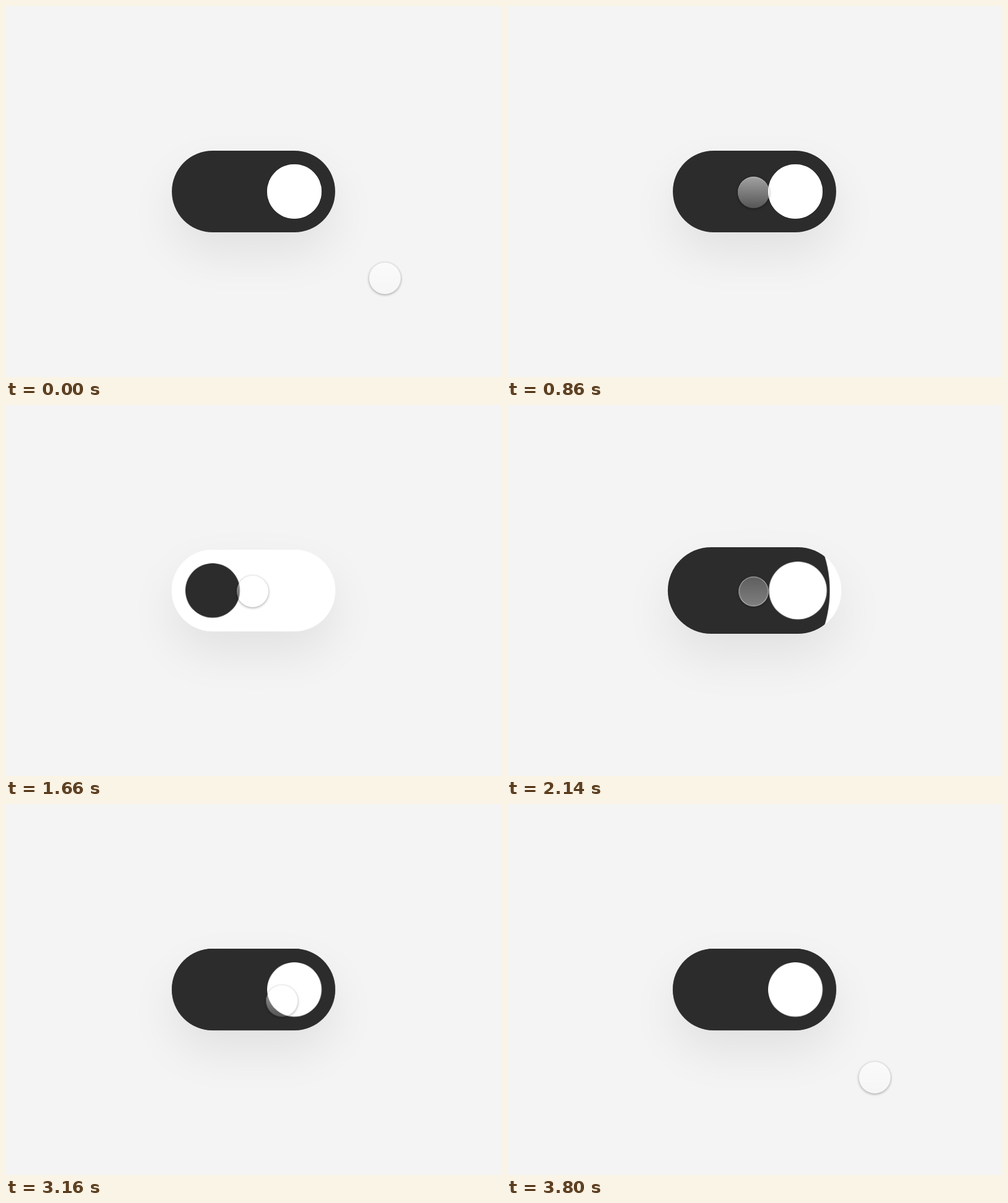
An HTML page for the animation above (3820 ms loop, 800x600 px).

```html
<!DOCTYPE html>
<html lang="en">
<head>
<meta charset="utf-8">
<title>Toggle</title>
<style>
  :root { --dark: #2c2c2c; --loop: 3820ms linear infinite; }
  html, body { margin: 0; width: 100%; height: 100%; overflow: hidden; background: #f4f4f4; }
  .stage { position: relative; width: 800px; height: 600px; overflow: hidden; }

  .toggle {
    position: absolute; left: 268px; top: 234px; width: 264px; height: 132px;
    border-radius: 66px;
    box-shadow: 0 34px 76px rgba(0, 0, 0, .08);
    animation: pop var(--loop);
  }
  .track {
    position: absolute; inset: 0; border-radius: inherit; overflow: hidden;
    background: var(--dark);
    animation: track var(--loop);
  }
  .knob { position: absolute; top: 22px; width: 88px; height: 88px; border-radius: 50%; }
  .light { left: 154px; background: #fff; }
  .shade { left: 22px; background: var(--dark); }
  .light.fill { animation: fill-light var(--loop); }
  .shade.fill { animation: fill-shade var(--loop); }

  .move-x, .move-y { position: absolute; left: 0; top: 0; }
  .move-x { animation: move-x var(--loop); }
  .move-y { animation: move-y var(--loop); }
  .cursor {
    position: absolute; left: -25.5px; top: -25.5px; width: 51px; height: 51px;
    border-radius: 50%;
    box-shadow: 0 1px 4px rgba(0, 0, 0, .4);
    animation: press var(--loop);
  }
  .cursor i { position: absolute; inset: 0; border-radius: 50%; }
  .idle {
    background: linear-gradient(rgba(255, 255, 255, .56), rgba(255, 255, 255, .2));
    box-shadow: inset 0 1px 1px rgba(255, 255, 255, .35);
    animation: idle var(--loop);
  }
  .pressed {
    background: linear-gradient(rgba(255, 255, 255, .24), rgba(255, 255, 255, .4));
    box-shadow: inset 0 0 0 1.2px rgba(255, 255, 255, .5);
    animation: pressed var(--loop);
  }

  @keyframes pop {
    0%, 23.04% { transform: scale(1); animation-timing-function: cubic-bezier(.3, 0, .5, 1); }
    28.01% { transform: scale(1.063); animation-timing-function: cubic-bezier(.25, 1, .5, 1); }
    51.31% { transform: scale(1); animation-timing-function: cubic-bezier(.3, 0, .5, 1); }
    56.68% { transform: scale(1.063); animation-timing-function: cubic-bezier(.25, 1, .5, 1); }
    82.85%, 100% { transform: scale(1); }
  }
  @keyframes track {
    0%, 29% { background: var(--dark); }
    29.01%, 57.2% { background: #fff; }
    57.21%, 100% { background: var(--dark); }
  }
  @keyframes fill-light {
    0%, 23.04% { transform: scale(1); animation-timing-function: cubic-bezier(.3, .1, .8, .9); }
    28.8%, 57.2% { transform: scale(4.7); }
    57.21%, 100% { transform: scale(1); }
  }
  @keyframes fill-shade {
    0%, 51.31% { transform: scale(1); animation-timing-function: cubic-bezier(.3, .1, .8, .9); }
    57.07%, 99.9% { transform: scale(4.7); }
    99.91%, 100% { transform: scale(1); }
  }

  /* The pointer swings past the middle, settles, clicks twice and leaves. */
  @keyframes move-x {
    0% { transform: translateX(612px); animation-timing-function: cubic-bezier(.35, .1, .5, 1); }
    13.1% { transform: translateX(329px); animation-timing-function: cubic-bezier(.45, 0, .4, 1); }
    22.5%, 75.92% { transform: translateX(398px); animation-timing-function: cubic-bezier(.33, 0, .67, .45); }
    82.72% { transform: translateX(445px); animation-timing-function: cubic-bezier(.33, .43, .67, .68); }
    100% { transform: translateX(598px); }
  }
  @keyframes move-y {
    0% { transform: translateY(440px); animation-timing-function: cubic-bezier(.35, .1, .5, 1); }
    13.1% { transform: translateY(288px); animation-timing-function: cubic-bezier(.45, 0, .4, 1); }
    22.5%, 75.92% { transform: translateY(301px); animation-timing-function: cubic-bezier(.33, 0, .67, .3); }
    82.72% { transform: translateY(318px); animation-timing-function: cubic-bezier(.33, .24, .67, .74); }
    100% { transform: translateY(445px); }
  }
  @keyframes press {
    0%, 23.04%, 33%, 51.31%, 61.3%, 100% { transform: scale(1); animation-timing-function: ease-in-out; }
    26.2%, 28.3%, 54.5%, 56.6% { transform: scale(.945); animation-timing-function: ease-in-out; }
  }
  @keyframes idle {
    0%, 23.04%, 33%, 51.31%, 61.3%, 100% { opacity: 1; }
    26.2%, 28.3%, 54.5%, 56.6% { opacity: 0; }
  }
  @keyframes pressed {
    0%, 23.04%, 33%, 51.31%, 61.3%, 100% { opacity: 0; }
    26.2%, 28.3%, 54.5%, 56.6% { opacity: 1; }
  }
</style>
</head>
<body>
<div class="stage">
  <div class="toggle">
    <div class="track">
      <div class="knob light fill"></div>
      <div class="knob shade fill"></div>
      <div class="knob light"></div>
    </div>
  </div>
  <div class="move-x"><div class="move-y">
    <div class="cursor"><i class="idle"></i><i class="pressed"></i></div>
  </div></div>
</div>
</body>
</html>
```
